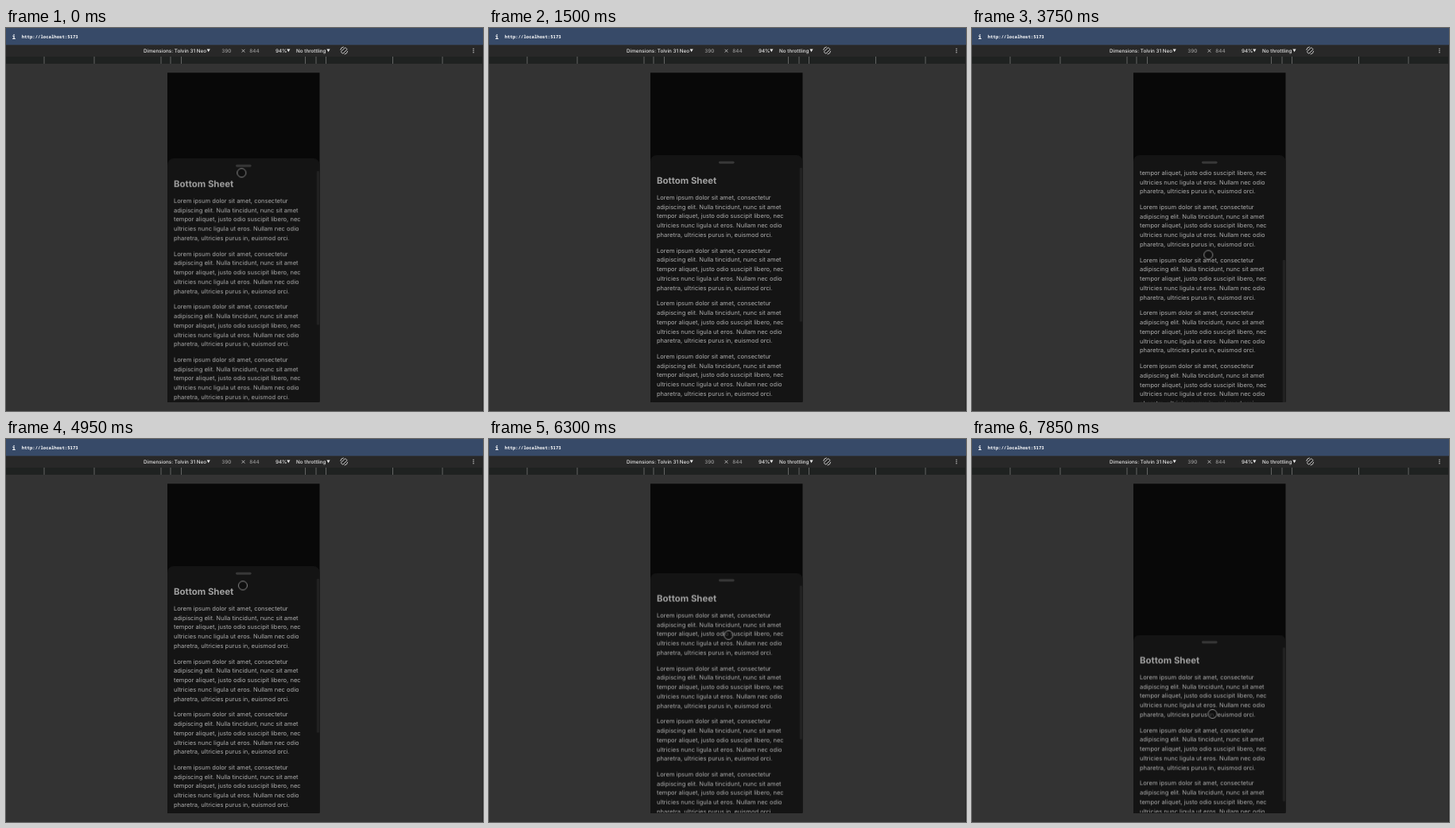
An HTML page for the animation above (8 s loop, 600 by 482 pixels).

```html
<!DOCTYPE html>
<html lang="en">
<head>
<meta charset="utf-8">
<title>Bottom sheet</title>
<style>
  html, body { margin: 0; width: 100%; height: 100%; overflow: hidden; background: #333; }
  svg { display: block; width: 100%; height: 100%; }
  text { font-family: Inter, Roboto, sans-serif; text-rendering: geometricPrecision; white-space: pre; }
  .mono { font-family: "Noto Sans Mono", "DejaVu Sans Mono", monospace; fill: #fff; }
  .bar text { font-size: 6.3px; font-weight: 450; fill: #e6e6e6; }
  .bar .dim { fill: #999; }
  .title { font-size: 11.45px; font-weight: 700; fill: #a0a0a0; }
  .copy { font-size: 7.56px; fill: #acacac; }

  #sheet, #scroll, #thumb, #cursor { animation: 8s linear infinite; }
  #sheet { animation-name: drag; }
  #scroll { animation-name: scroll; }
  #thumb { animation-name: thumb; }
  #cursor { animation-name: point; }
  #ring { animation: blink 8s step-end infinite; }

  /* The sheet follows half of the pointer's travel, then springs back. */
  @keyframes drag {
    0% { transform: translateY(4px); animation-timing-function: ease-out; }
    10%, 12% { transform: translateY(76px); animation-timing-function: ease-out; }
    16%, 21.9% { transform: translateY(0); animation-timing-function: ease-in-out; }
    31.5%, 33.8% { transform: translateY(60px); }
    38.125% { transform: translateY(23px); animation-timing-function: ease-out; }
    41.5%, 65.6% { transform: translateY(0); }
    71.875% { transform: translateY(39px); animation-timing-function: ease-out; }
    75%, 76.25% { transform: translateY(56px); animation-timing-function: ease-out; }
    80%, 83.9% { transform: translateY(0); }
    84.375% { transform: translateY(.8px); animation-timing-function: ease-in-out; }
    95.6%, 100% { transform: translateY(86.5px); }
  }
  @keyframes point {
    0% { transform: translate(296.3px, 182px); animation-timing-function: ease-out; }
    10%, 16% { transform: translate(303px, 326px); }
    21.8%, 21.9% { transform: translate(296px, 174px); animation-timing-function: ease-in-out; }
    31.5%, 33.8% { transform: translate(304px, 294px); }
    38.125% { transform: translate(302.5px, 252px); animation-timing-function: ease-in-out; }
    43% { transform: translate(300px, 270px); }
    46.875%, 54.5% { transform: translate(297.3px, 285.5px); animation-timing-function: ease-in-out; }
    64%, 65.6% { transform: translate(298px, 173px); }
    71.875% { transform: translate(304.3px, 250px); animation-timing-function: ease-out; }
    75%, 76.25% { transform: translate(304px, 284px); animation-timing-function: ease-in-out; }
    82.5%, 83.9% { transform: translate(296px, 173px); }
    84.375% { transform: translate(296px, 174.5px); animation-timing-function: ease-in-out; }
    95.6%, 100% { transform: translate(302.5px, 346px); }
  }
  @keyframes blink {
    0% { visibility: visible; }
    16% { visibility: hidden; }
    21.8%, 100% { visibility: visible; }
  }
  @keyframes scroll {
    0%, 42.5% { transform: translateY(0); animation-timing-function: ease-out; }
    46.875%, 48.5% { transform: translateY(-188px); animation-timing-function: ease-in-out; }
    54%, 100% { transform: translateY(0); }
  }
  @keyframes thumb {
    0%, 42.5% { transform: translateY(0); animation-timing-function: ease-out; }
    46.875%, 48.5% { transform: translateY(116px); animation-timing-function: ease-in-out; }
    54%, 100% { transform: translateY(0); }
  }
</style>
</head>
<body>
<svg viewBox="0 0 600 482">
  <defs>
    <clipPath id="screen"><rect x="203" y="56.3" width="191.5" height="414"/></clipPath>
    <clipPath id="body"><rect x="203" y="176" width="192" height="314"/></clipPath>
    <path id="caret" d="M0 0h4.2l-2.1 3.7z" fill="#e6e6e6"/>
  </defs>

  <rect width="600" height="482" fill="#333"/>
  <rect width="600" height="21.5" fill="#374a68"/>
  <text class="mono" x="7.6" y="14" font-size="8" font-weight="700">i</text>
  <text class="mono" x="19.8" y="13.3" font-size="5.64" font-weight="600">http://localhost:5173</text>

  <g class="bar">
    <rect y="21.5" width="600" height="14.5" fill="#282828"/>
    <text x="173" y="30.6">Dimensions: Tolvin 31 Neo</text>
    <use href="#caret" x="252.6" y="26.5"/>
    <text class="dim" x="271.3" y="30.6">390</text>
    <path d="M296.6 26.8l3.8 3.8m0-3.8l-3.8 3.8" stroke="#d0d0d0" stroke-width=".8"/>
    <text class="dim" x="306.3" y="30.6">844</text>
    <text x="339" y="30.6">94%</text>
    <use href="#caret" x="353.2" y="26.5"/>
    <text x="365" y="30.6">No throttling</text>
    <use href="#caret" x="403.4" y="26.5"/>
    <g fill="none" stroke="#d6d6d6" stroke-width=".9" transform="translate(425.2 28.4)">
      <rect x="-1.7" y="-3.9" width="3.4" height="7.8" rx=".5" transform="rotate(45)"/>
      <path d="M-.4-4.6A4.6 4.6 0 0 0-4.5-.4M.4 4.6A4.6 4.6 0 0 0 4.5.4"/>
    </g>
    <g fill="#d6d6d6">
      <circle cx="588" cy="26.2" r=".7"/><circle cx="588" cy="28.5" r=".7"/><circle cx="588" cy="30.8" r=".7"/>
    </g>
  </g>

  <rect y="36" width="600" height="9" fill="#1f2221"/>
  <path id="ticks" stroke="#777" stroke-width=".8"/>
  <rect x="599" y="21.5" width="1" height="460.5" fill="#262626"/>

  <g clip-path="url(#screen)">
    <rect x="203" y="56" width="192" height="415" fill="#080808"/>
    <g id="sheet">
      <rect x="203" y="160" width="191.5" height="340" rx="7.85" fill="#141414"/>
      <rect x="289" y="167.8" width="19.6" height="2.9" rx="1.45" fill="#383838"/>
      <g clip-path="url(#body)">
        <g id="scroll"><text class="title" x="211" y="195.7">Bottom Sheet</text></g>
        <rect id="thumb" x="390.7" y="176" width="3.5" height="193.5" rx="1" fill="#222"/>
      </g>
    </g>
  </g>

  <g id="cursor"><circle id="ring" r="5.5" fill="#0c0c0c" fill-opacity=".65" stroke="#a6a6a6" stroke-width=".8"/></g>
</svg>
<script>
  const LINES = [
    "Lorem ipsum dolor sit amet, consectetur",
    "adipiscing elit. Nulla tincidunt, nunc sit amet",
    "tempor aliquet, justo odio suscipit libero, nec",
    "ultricies nunc ligula ut eros. Nullam nec odio",
    "pharetra, ultricies purus in, euismod orci."
  ];
  const PARAGRAPHS = 7, LINE_STEP = 11.77, PARAGRAPH_STEP = 66.7, FIRST_BASELINE = 215.8;
  const scroll = document.getElementById("scroll");

  function addLine(content, y) {
    const text = document.createElementNS("http://www.w3.org/2000/svg", "text");
    text.setAttribute("class", "copy");
    text.setAttribute("x", 211);
    text.setAttribute("y", y);
    text.textContent = content;
    scroll.append(text);
  }

  for (let p = 0; p < PARAGRAPHS; p++) {
    LINES.forEach((line, i) => addLine(line, FIRST_BASELINE + p * PARAGRAPH_STEP + i * LINE_STEP));
  }

  const ticks = [48, 111, 195, 207, 220.5, 376.5, 390, 402.5, 486.5, 549];
  document.getElementById("ticks").setAttribute("d", ticks.map(x => `M${x} 36v9`).join(""));
</script>
</body>
</html>
```
